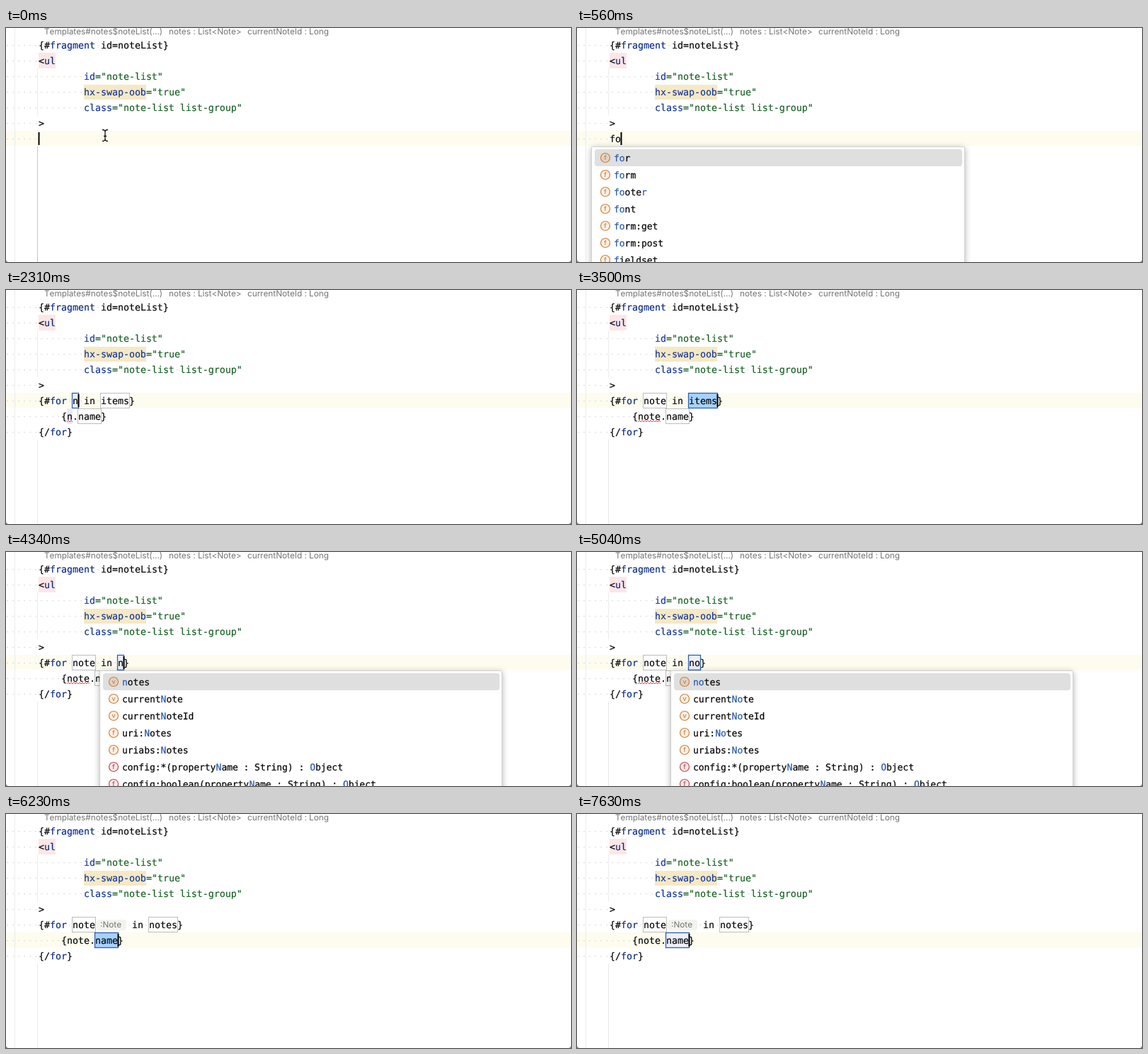
Write an HTML page that moves like this. It is 798 by 330 pixels and loops after 8000 ms.

```html
<!DOCTYPE html>
<html lang="en">
<head>
<meta charset="utf-8">
<title>Code template expansion</title>
<style>
  html, body { margin: 0; width: 100%; height: 100%; overflow: hidden; background: #fff; }
  svg { display: block; width: 798px; height: 330px; }
  text { white-space: pre; text-rendering: geometricPrecision; }
  .code { font: 13.289px "DejaVu Sans Mono", monospace; stroke-width: .2px; }
  .list { font: 12.957px "DejaVu Sans Mono", monospace; stroke-width: .25px; }
  .ui { font: 11.75px Inter, sans-serif; font-kerning: none; }
  .icon { font: 9px Inter, sans-serif; text-anchor: middle; stroke-width: .2px; }
  .ui { stroke-width: 0; }
  .popup { filter: drop-shadow(0 2px 4px rgba(0, 0, 0, .3)); }
</style>
</head>
<body>
<svg id="stage" viewBox="0 0 798 330"></svg>
<script>
const LOOP = 8000, CELL = 8, LEFT = -2, ROW = 22, LIST_CELL = 7.8;
const INK = '#080808', KEYWORD = '#0b2c85', ATTR = '#17389a', STRING = '#176223', MUTED = '#747474';
const BLUE = '#2c60b8', MATCH = '#2a5cab', ORANGE = '#d2813a', RED = '#c5494f';
const stage = document.getElementById('stage');

const rowTop = row => 13 + ROW * row;
const escapeText = s => s.replace(/&/g, '&amp;').replace(/</g, '&lt;');
const rect = (x, y, w, h, fill, more = '') =>
  `<rect x="${x}" y="${y}" width="${w}" height="${h}" fill="${fill}" ${more}/>`;
const label = (x, y, s, cls, color) =>
  `<text x="${x}" y="${y}" class="${cls}" fill="${color}" stroke="${color}">${escapeText(s)}</text>`;
const between = (t, a, b) => t >= a && t < b;
const pick = (t, steps) => steps.reduce((value, [at, next]) => t >= at ? next : value, steps[0][1]);

// Draws coloured tokens in a fixed grid; every space shows a faint dot.
function code(row, tokens, x = LEFT) {
  let out = '';
  for (const [s, fill = INK] of tokens) {
    [...s].forEach((c, i) => {
      if (c === ' ') out += rect(x + i * CELL + 3.5, rowTop(row) + 11, 1.2, 1.2, '#c9c9c9');
    });
    const lead = s.length - s.trimStart().length;
    if (s.trim()) out += label(x + lead * CELL, rowTop(row) + 16, s.trim(), 'code', fill);
    x += s.length * CELL;
  }
  return out;
}

const indent = n => [' '.repeat(n)];

function squiggle(x, y, length, color) {
  let d = `M${x} ${y + 2}`;
  for (let i = 2; i <= length; i += 2) d += `L${x + i} ${y + (i % 4 ? 0 : 2)}`;
  return `<path d="${d}" fill="none" stroke="${color}" stroke-width="1"/>`;
}

function field(row, x, s, active, selected) {
  const fill = active ? (selected ? '#a6d2ff' : '#edeffa') : '#fff';
  return rect(x - .5, rowTop(row) + .5, s.length * CELL + 1, 21, fill,
    `stroke="${active ? BLUE : '#bdbdbd'}" stroke-width="${active ? 1.3 : 1}"`);
}

const caret = (row, x) => rect(x - .5, rowTop(row) + 2, 2, 18, '#000');

// Square brackets mark the letters matching the typed prefix.
function listItem(x, y, [kind, color, s], prefix) {
  let out = `<circle cx="${x + 20}" cy="${y}" r="6.5" fill="${color}" fill-opacity=".12"` +
    ` stroke="${color}" stroke-width="1.2"/>`;
  out += label(x + 20, y + 3, kind, 'icon', color);
  let tx = x + 32;
  s.split(/[\[\]]/).forEach((part, i) => {
    const hit = i % 2 ? prefix : 0;
    for (const [piece, fill] of [[part.slice(0, hit), MATCH], [part.slice(hit), INK]]) {
      const lead = piece.length - piece.trimStart().length;
      if (piece) out += label(tx + lead * LIST_CELL, y + 5, piece.trim(), 'list', fill);
      tx += piece.length * LIST_CELL;
    }
  });
  return out;
}

function popup(x, right, items, prefix) {
  return rect(x + .5, 167.5, right - x - 1, 190, '#fff', 'class="popup" stroke="#d0d0d0" rx="1"')
    + rect(x + 5, 171, right - x - 9, 24, '#dfdfdf', 'rx="4"')
    + items.map((item, i) => listItem(x, 183 + 24 * i, item, prefix)).join('');
}

const TAGS = ['[for]', '[for]m', '[fo]ote[r]', '[fo]nt', '[for]m:get', '[for]m:post', '[f]ieldset']
  .map(s => ['f', ORANGE, s]);
const VALUES = [
  ['v', ORANGE, '[no]tes'], ['v', ORANGE, 'current[No]te'], ['v', ORANGE, 'current[No]teId'],
  ['f', ORANGE, 'uri:[No]tes'], ['f', ORANGE, 'uriabs:[No]tes'],
  ['f', RED, 'config:*(property[N]ame : String) : [O]bject'],
  ['f', RED, 'config:boolean(property[N]ame : String) : [O]bject']
];

const header =
  label(54, 9, 'Templates#notes$noteList(...)', 'ui', MUTED) +
  label(230, 9, 'notes : List<Note>', 'ui', MUTED) +
  label(341, 9, 'currentNoteId : Long', 'ui', MUTED) +
  rect(46, 35, 24, 22, '#fde6e6') + rect(110, 80, 88, 21, '#f5e9c5') +
  code(0, [indent(6), ['{#'], ['fragment', KEYWORD], [' id=noteList}']]) +
  code(1, [indent(6), ['<'], ['ul', KEYWORD]]) +
  code(2, [indent(14), ['id', ATTR], ['="note-list"', STRING]]) +
  code(3, [indent(14), ['hx-swap-oob', ATTR], ['="true"', STRING]]) +
  code(4, [indent(14), ['class', ATTR], ['="note-list list-group"', STRING]]) +
  code(5, [indent(6), ['>']]);

const corners = '<path d="M0 326V330H4Q0 330 0 326M798 326V330H794Q798 330 798 326" fill="#777"/>';

const mouse = '<path d="M136 143.5q4 0 4 3q0 -3 4 -3M140 146v11M136 159.5q4 0 4 -3q0 3 4 3M138 152.5h4"' +
  ' fill="none" stroke="#111" stroke-width="1.3"/>';

function typing(t) {
  const word = pick(t, [[0, ''], [280, 'f'], [490, 'fo'], [980, 'for']]);
  return code(6, [indent(6), [word]]) + caret(6, 46 + word.length * CELL)
    + (t < 280 ? mouse : '')
    + (between(t, 560, 1260) ? popup(20, 548, TAGS, word.length) : '');
}

function template(t) {
  const item = pick(t, [[1400, 'item'], [2310, 'n'], [2520, 'no'], [2800, 'not'], [3010, 'note']]);
  const list = pick(t, [[1400, 'items'], [4270, 'n'], [4550, 'no'], [5250, 'notes']]);
  const active = pick(t, [[1400, 0], [3360, 1], [6160, 2]]);
  const selected = between(t, 1400, 2310) || between(t, 3360, 4270) || between(t, 6160, 7560);
  const caretOn = !between(t, 5040, 5250) && !between(t, 7210, 7560);
  const hinted = t >= 5670;

  const itemX = 94, itemEnd = itemX + item.length * CELL;
  const inX = itemEnd + (hinted ? 44 : 0), listX = inX + 4 * CELL;
  const listEnd = listX + list.length * CELL;
  const nameX = 86 + (item.length + 1) * CELL, nameEnd = nameX + 4 * CELL;

  let out = field(6, itemX, item, active === 0, selected)
    + field(6, listX, list, active === 1, selected)
    + field(7, nameX, 'name', active === 2, selected);
  if (active === 0) out += rect(86, 167, item.length * CELL, 22, '#e9e9fa');
  if (hinted) {
    out += rect(128, 149, 42, 15, '#f3f3ee', 'rx="4"') + label(133, 160, ':Note', 'ui', MUTED);
  }
  out += code(6, [indent(6), ['{#'], ['for', KEYWORD], [' '], [item]])
    + code(6, [[' in '], [list], ['}']], inX)
    + code(7, [indent(10), ['{' + item + '.name}']])
    + code(8, [indent(6), ['{/'], ['for', KEYWORD], ['}']]);
  if (between(t, 2030, 6020)) out += squiggle(86, 184, item.length * CELL, '#e0474c');
  if (caretOn) out += caret(active === 2 ? 7 : 6, [itemEnd, listEnd, nameEnd][active]);
  if (between(t, 4340, 5250)) out += popup(132, 701, VALUES, list.length);
  return out;
}

function draw(t) {
  const expanded = t >= 1400;
  const guideTop = expanded ? 211 : 167;
  return rect(0, 0, 798, 330, '#fff')
    + rect(0, rowTop(t >= 6160 ? 7 : 6), 798, 21, '#fdfcee')
    + rect(12, 0, 1, 330, '#ececec')
    + rect(44, 57, 1, 66, '#ececec')
    + rect(44, guideTop, 1, 330 - guideTop, t < 280 ? '#c6c6c6' : '#e8e8e8')
    + header + (expanded ? template(t) : typing(t)) + corners;
}

let shown = '';
function tick() {
  const markup = draw(performance.now() % LOOP);
  if (markup !== shown) stage.innerHTML = shown = markup;
  requestAnimationFrame(tick);
}
tick();
</script>
</body>
</html>
```
